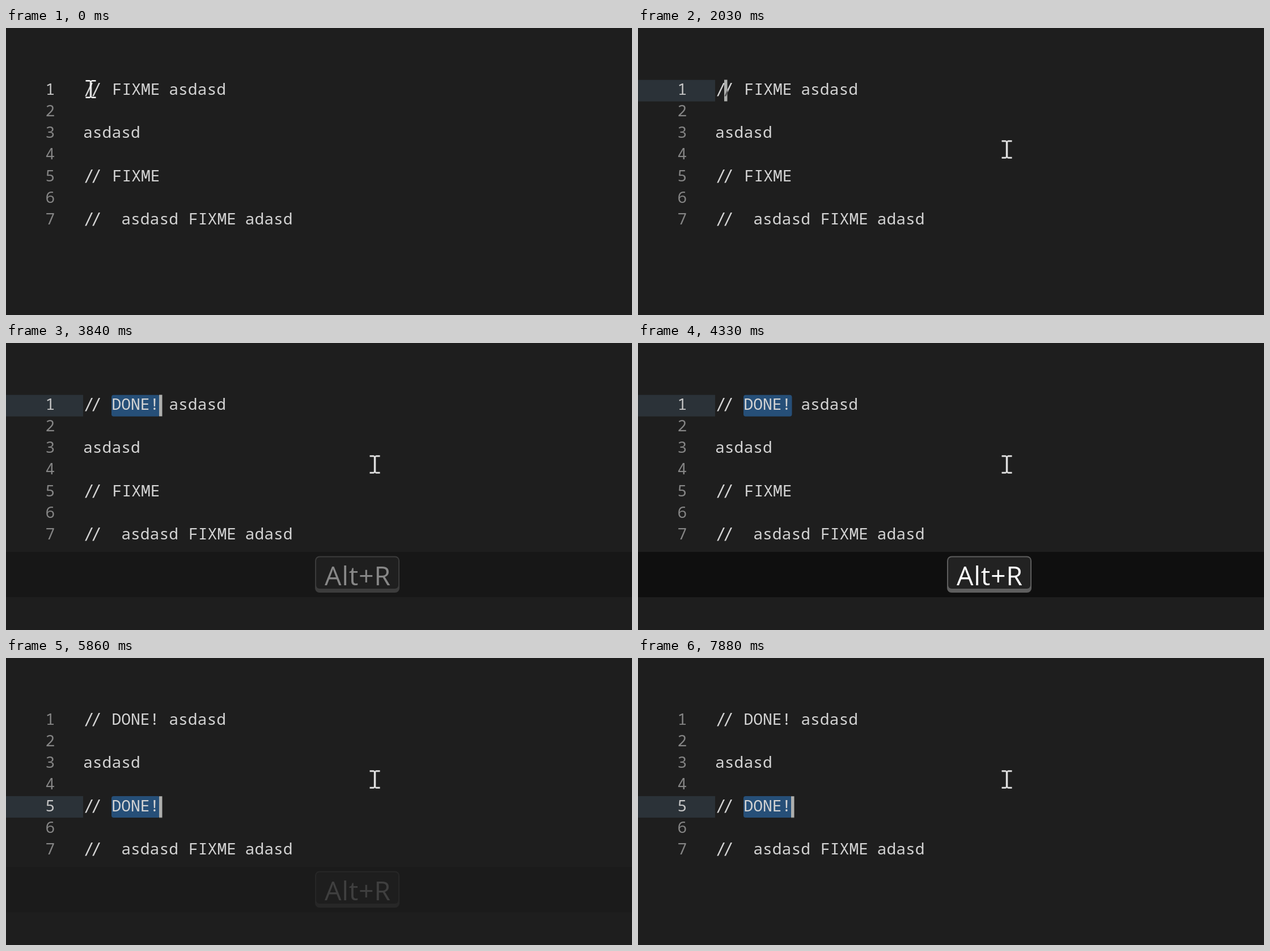
An HTML page that plays this animation: 1104x507 px, repeating every 8000 ms.

```html
<!DOCTYPE html>
<html lang="en">
<head>
<meta charset="utf-8">
<title>Editor</title>
<style>
html, body { margin: 0; width: 100%; height: 100%; overflow: hidden; background: #1e1e1e; }
svg { display: block; width: 1104px; height: 507px; }
text { font: 28px "Noto Sans Mono", "DejaVu Sans Mono", monospace; fill: #d4d4d4; white-space: pre; }
.num text { fill: #858585; }
.slash { font: 29px "DejaVu Sans Mono", monospace; letter-spacing: -4.4px; }
.key text { font: 46.5px "Open Sans", "Noto Sans", sans-serif; letter-spacing: .8px; fill: #fff; text-anchor: middle; }

/* every state holds until the next one: 1% = 80 ms */
.click, .first, .third, .before1, .after1, .before5, .after5, .sel1, .caret, .under,
.cast, .key, .pointer, .num .n1, .num .n5 { animation: 8s step-end infinite; }

.click { animation-name: click; }
@keyframes click { 0%, 13.875%, 100% { opacity: 0 } 12.625% { opacity: 1 } }

.first { animation-name: first; }
@keyframes first { 0%, 73.25%, 100% { opacity: 0 } 12.625% { opacity: 1 } }
.sel1 { animation-name: sel1; }
@keyframes sel1 { 0%, 73.25%, 100% { opacity: 0 } 48% { opacity: 1 } }

.before1, .under { animation-name: before1; }
@keyframes before1 { 0% { opacity: 1 } 48%, 100% { opacity: 0 } }
.after1 { animation-name: after1; }
@keyframes after1 { 0% { opacity: 0 } 48%, 100% { opacity: 1 } }
.before5 { animation-name: before5; }
@keyframes before5 { 0% { opacity: 1 } 73.25%, 100% { opacity: 0 } }
.after5, .third { animation-name: after5; }
@keyframes after5 { 0% { opacity: 0 } 73.25%, 100% { opacity: 1 } }

.num .n1 { animation-name: dim; }
@keyframes dim { 0% { fill: #c6c6c6 } 73.25%, 100% { fill: #858585 } }
.num .n5 { animation-name: lit; }
@keyframes lit { 0% { fill: #858585 } 73.25%, 100% { fill: #c6c6c6 } }

.caret { animation-name: blink, jump; }
@keyframes blink {
  0%, 19.125%, 31.625%, 44.25%, 54.125%, 65.75%, 79.5%, 92.25% { opacity: 0 }
  12.625%, 25.375%, 37.875%, 48%, 60.5%, 73.25%, 86%, 98.5%, 100% { opacity: 1 }
}
@keyframes jump {
  0% { transform: none }
  48% { transform: translate(118px, 0) }
  73.25%, 100% { transform: translate(118px, 152.5px) }
}

.cast { animation-name: cast; }
@keyframes cast {
  0%, 58%, 84.75%, 100% { opacity: 0 }
  48% { opacity: .47 }
  49.25% { opacity: .95 }
  50.5%, 75.75% { opacity: 1 }
  56.75%, 83.5% { opacity: .5 }
  73.25% { opacity: .15 }
  74.5% { opacity: .87 }
}
.key { animation-name: key; }
@keyframes key { 0%, 56.75%, 83.5%, 100% { opacity: 0 } 48%, 73.25% { opacity: 1 } }

.pointer { animation-name: move; }
@keyframes move {
  0% { transform: translate(149.5px, 108px) }
  15.125% { transform: translate(186px, 117px) }
  16.375% { transform: translate(330px, 150px) }
  17.625% { transform: translate(530px, 195px) }
  18.875% { transform: translate(650px, 212px) }
  20.125% { transform: translate(667px, 214px) }
  21.375%, 100% { transform: translate(650.5px, 214.5px) }
}
</style>
</head>
<body>
<svg viewBox="0 0 1104 507">
  <defs>
    <clipPath id="cell"><rect x="152" y="91.5" width="5.5" height="38"/></clipPath>
  </defs>

  <rect class="first" y="91.7" width="136" height="38" fill="#2b3238"/>
  <rect class="third" y="244" width="136" height="38" fill="#2b3238"/>
  <rect class="sel1" x="186" y="91.7" width="85.5" height="38" rx="4" fill="#264f78"/>
  <rect class="third" x="186" y="244" width="85.5" height="38" rx="4" fill="#264f78"/>

  <g class="num">
    <text class="n1" x="69.6" y="118">1</text>
    <text x="69.6" y="156.1">2</text>
    <text x="69.6" y="194.2">3</text>
    <text x="69.6" y="232.4">4</text>
    <text class="n5" x="69.6" y="270.5">5</text>
    <text x="69.6" y="308.6">6</text>
    <text x="69.6" y="346.7">7</text>
  </g>

  <text class="slash" x="137.8" y="118.3">//</text>
  <text class="before1" x="187.6" y="118">FIXME</text>
  <text class="after1" x="186.4" y="118">DONE!</text>
  <text x="287.2" y="118">asdasd</text>

  <text x="136" y="194.2">asdasd</text>

  <text class="slash" x="137.8" y="270.8">//</text>
  <text class="before5" x="187.6" y="270.5">FIXME</text>
  <text class="after5" x="186.4" y="270.5">DONE!</text>

  <text class="slash" x="137.8" y="347">//</text>
  <text x="203.2" y="346.7">asdasd</text>
  <text x="322" y="346.7">FIXME</text>
  <text x="421.6" y="346.7">adasd</text>

  <g class="caret">
    <rect x="152" y="91.5" width="5.5" height="38" fill="#aeafad"/>
    <g class="under" clip-path="url(#cell)">
      <text class="slash" x="150.9" y="118.3" style="fill:#515052">/</text>
    </g>
  </g>

  <g class="cast">
    <rect y="369" width="1104" height="80" fill="#0f0f0f"/>
    <g class="key">
      <rect x="545" y="376.5" width="149" height="64.5" rx="8" fill="#5e5e5e"/>
      <rect x="547" y="378.5" width="145" height="55.5" rx="6" fill="#222"/>
      <text x="620.4" y="428">Alt+R</text>
    </g>
  </g>

  <circle class="click" cx="150" cy="108.7" r="21" fill="none" stroke="#f00" stroke-width="3.5"/>
  <g class="pointer">
    <path d="M-9-16H-2L0-14.5L2-16H9V-13.4H1.5V13.4H9V16H2L0 14.5L-2 16H-9V13.4H-1.5V-13.4H-9Z" fill="#fff"/>
  </g>
  <circle class="click" cx="147.6" cy="106.8" r="23.6" fill="#ff0" fill-opacity=".48"/>
</svg>
</body>
</html>
```
